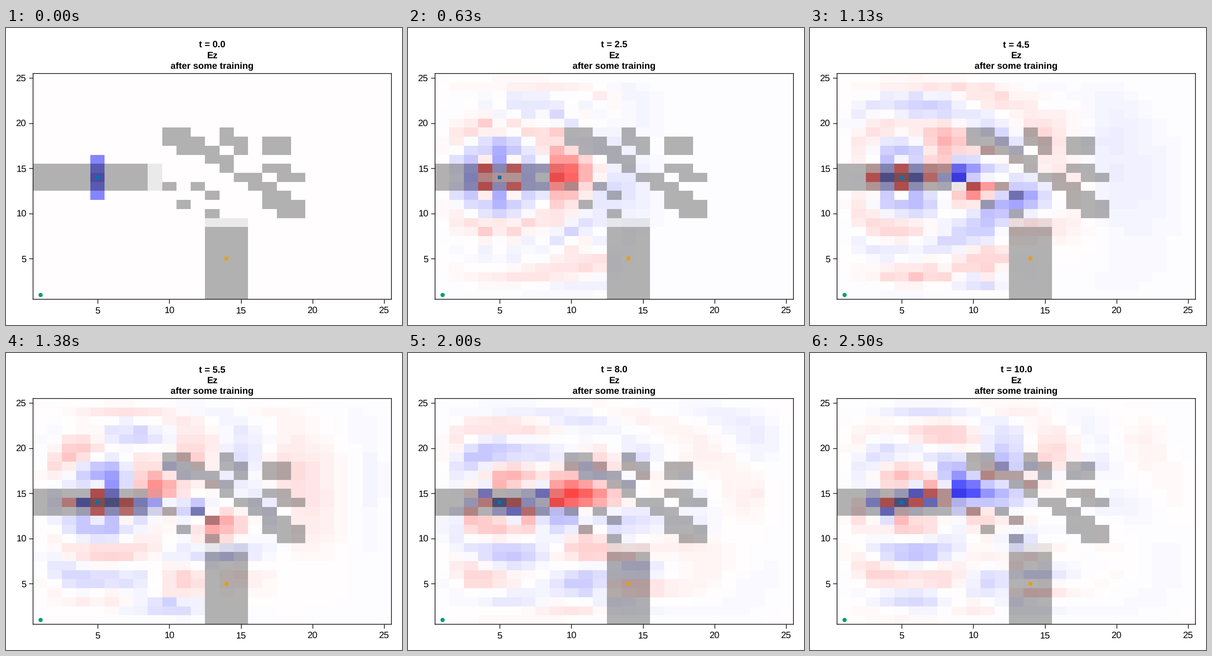
A matplotlib script for the animation above (2560 ms loop, 864 by 648 pixels).

```python
import numpy as np
import matplotlib.pyplot as plt
from matplotlib.animation import FuncAnimation

W, H = 864, 648
FRAMES, LOOP_MS = 41, 2560
CELLS, PAD = 25, 6
STEPS_PER_PERIOD, STEPS_PER_FRAME = 16, 4
COURANT = 0.5
EPS_CLAD, EPS_CORE = 2.25, 12.25
UNIT = 1.44
LEFT, RIGHT, TOP, BOTTOM = 41 * UNIT, 584 * UNIT, 69 * UNIT, 411 * UNIT

# filled cells of the design region: row -> columns
DESIGN = {
    19: (10, 11, 14),
    18: (10, 11, 12, 14, 15, 17, 18),
    17: (11, 12, 13, 15, 17, 18),
    16: (13, 14),
    15: (14, 17, 18),
    14: (15, 16, 18, 19),
    13: (10, 12, 16, 17),
    12: (13, 17, 18),
    11: (11, 17, 18, 19),
    10: (13, 18, 19),
}

plt.rcParams.update({"font.family": "Liberation Sans", "font.size": 14 * UNIT,
                     "text.hinting": "none"})


def build_layout():
    """Core density on the padded grid, indexed [y, x]."""
    n = CELLS + 2 * PAD
    core = np.zeros((n, n))
    o = PAD - 1
    core[o + 13:o + 16, :o + 9] = 1
    core[o + 13:o + 16, o + 9] = 0.5
    core[:o + 9, o + 13:o + 16] = 1
    core[o + 9, o + 13:o + 16] = 0.5
    for y, columns in DESIGN.items():
        for x in columns:
            core[o + y, o + x] = 1
    return core


def absorb(y, x):
    """Per-step damping that grows towards the borders."""
    def loss(i):
        depth = np.maximum(0, np.maximum(3.2 - i, i - 22.8))
        return np.minimum(0.12 * depth ** 1.5, 0.7)
    return np.exp(-loss(y)[:, None] - loss(x)[None, :])


def simulate(core):
    """Time-domain solution of Ez around a line source in the left guide."""
    n = len(core)
    cell = np.arange(n) - PAD + 1.0
    mid = cell[:-1] + 0.5
    damp_e, damp_x, damp_y = absorb(cell, cell), absorb(mid, cell), absorb(cell, mid)
    eps = EPS_CLAD + (EPS_CORE - EPS_CLAD) * core
    gain = COURANT / eps[1:-1, 1:-1]
    ez, hx, hy = np.zeros((n, n)), np.zeros((n - 1, n)), np.zeros((n, n - 1))
    o = PAD - 1
    beam = np.array([0.24, 0.43, 0.63, 0.43, 0.24])
    shots = []
    for step in range((FRAMES - 1) * STEPS_PER_FRAME + 1):
        hx = (hx - COURANT * np.diff(ez, axis=0)) * damp_x
        hy = (hy + COURANT * np.diff(ez, axis=1)) * damp_y
        curl = np.diff(hy, axis=1)[1:-1] - np.diff(hx, axis=0)[:, 1:-1]
        ez[1:-1, 1:-1] += gain * curl
        ez *= damp_e
        ez[o + 12:o + 17, o + 5] -= beam * np.cos(2 * np.pi * step / STEPS_PER_PERIOD)
        if step % STEPS_PER_FRAME == 0:
            shots.append(ez[PAD:-PAD, PAD:-PAD].copy())
    return shots


core = build_layout()
fields = simulate(core)
density = core[PAD:-PAD, PAD:-PAD, None]
cover = 0.6 * density
shade = 1 - 0.5 * density
seismic = plt.get_cmap("seismic")


def picture(k):
    rgb = seismic(np.clip((fields[k] + 1) / 2, 0, 1))[..., :3]
    return rgb * (1 - cover) + shade * cover


fig = plt.figure(figsize=(W / 72, H / 72), dpi=72, facecolor="white")
ax = fig.add_axes([LEFT / W, 1 - BOTTOM / H, (RIGHT - LEFT) / W, (BOTTOM - TOP) / H])
image = ax.imshow(picture(0), origin="lower", extent=(0.5, 25.5, 0.5, 25.5),
                  aspect="auto", interpolation="nearest")

for x, y, marker, size, color in ((5, 14, "s", 8.2, "#0072B2"),
                                  (14, 5, "s", 8.2, "#E69F00"),
                                  (1, 1, "o", 9.2, "#009E73")):
    ax.plot(x, y, marker, ms=size, color=color, mew=0, snap=False)
ax.set(xlim=(0.5, 25.5), ylim=(0.5, 25.5))

ticks = range(5, 26, 5)
ax.set_xticks(ticks)
ax.set_yticks(ticks)
ax.tick_params(length=6 * UNIT, width=UNIT, labelbottom=False, labelleft=False)
for line in ax.get_xticklines() + ax.get_yticklines():
    line.set_snap(False)
for spine in ax.spines.values():
    spine.set_linewidth(UNIT)
    spine.set_snap(False)


def label(x, y, text, **style):
    """Text with its baseline at pixel (x, y) from the top left."""
    return fig.text(x / W, 1 - y / H, text, va="baseline", **style)


for v in ticks:
    part = (v - 0.5) / CELLS
    label(LEFT + part * (RIGHT - LEFT), 623, str(v), ha="center")
    label(LEFT - 10 * UNIT, BOTTOM - part * (BOTTOM - TOP) + 7.2, str(v), ha="right")

clock = label(450, 43, "t = 0.0", ha="center", weight="bold")
label(450, 66, "Ez", ha="center", weight="bold")
label(450, 89, "after some training", ha="center", weight="bold")


def update(k):
    image.set_data(picture(k))
    clock.set_text(f"t = {k * STEPS_PER_FRAME / STEPS_PER_PERIOD:.1f}")
    return image, clock


anim = FuncAnimation(fig, update, frames=FRAMES, interval=LOOP_MS / FRAMES,
                     repeat=True, repeat_delay=0)
plt.show()
```
